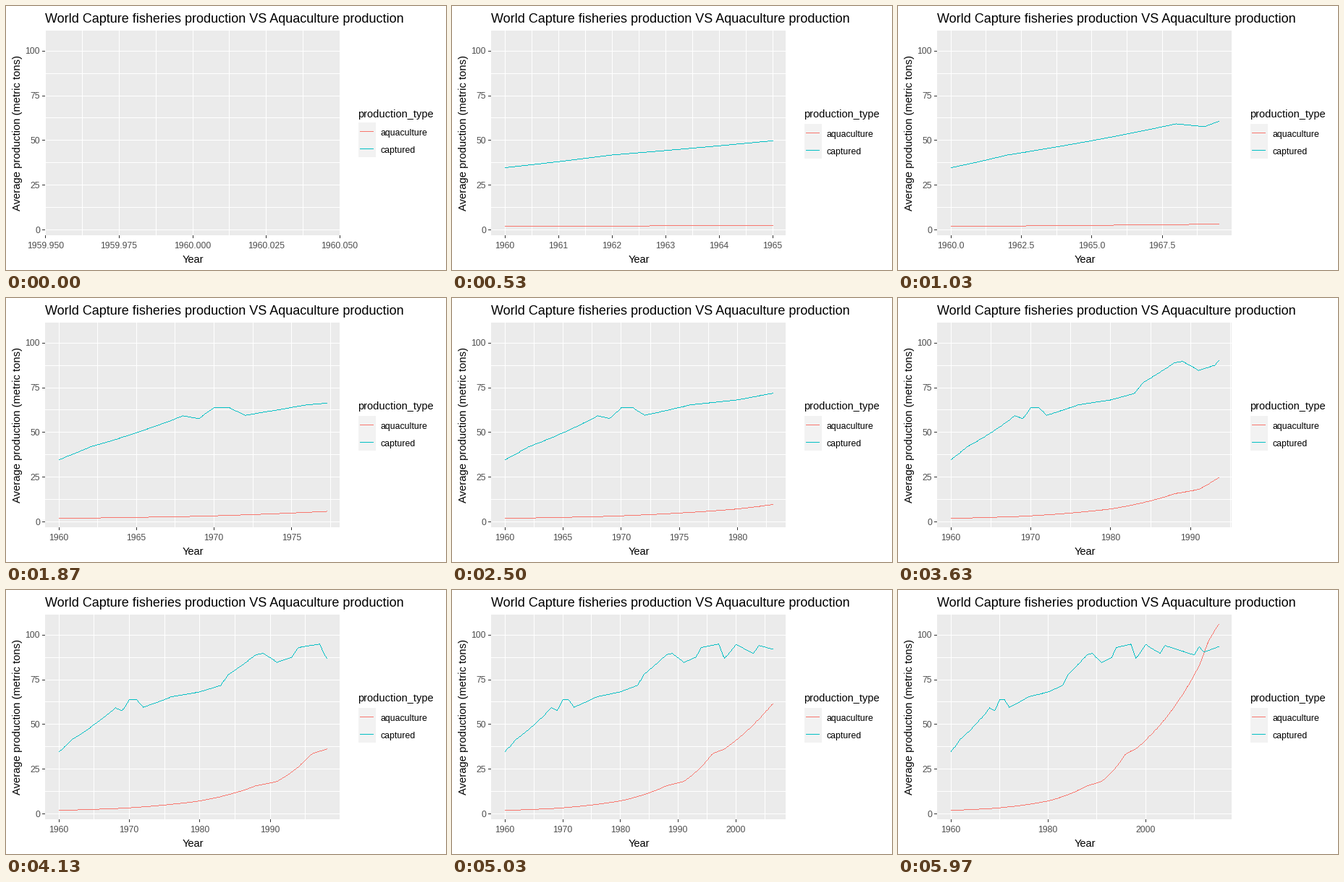
These frames come from a looping animation (608 px wide and 365 px high, 10000 ms). A matplotlib script:

```python
import math

import matplotlib.pyplot as plt
import numpy as np
from matplotlib.animation import FuncAnimation
from matplotlib.collections import LineCollection
from matplotlib.patches import Rectangle

W, H, DPI = 608, 365, 100
PX = 72 / DPI  # one pixel in points
LOOP, INTERVAL = 10000, 20
STEPS, STEP_RATE = 180, 0.03  # reveal steps, steps per ms
LEFT, RIGHT, TOP, BOTTOM = 54, 461, 34, 317
FIRST_YEAR, SPAN = 1960, 55
CORAL, TEAL = "#F8766D", "#00BFC4"

YEARS = np.arange(SPAN + 1)
YEAR_STEPS = np.round(YEARS * (STEPS - 1) / SPAN)


def growth(*turns):
    """Yearly values growing at a steady rate between turning points."""
    years, values = zip(*turns)
    return np.exp(np.interp(YEARS, years, np.log(values)))


AQUACULTURE = growth((0, 2), (9, 3.2), (20, 7.3), (28, 15.8), (31, 18.2),
                     (36, 33.8), (38, 36.3), (51, 82.7), (53, 97.2),
                     (55, 106))
CAPTURED = growth((0, 34.8), (2, 41.9), (8, 59.3), (9, 57.7), (10, 63.8),
                  (11, 63.8), (12, 59.6), (16, 65.5), (20, 68.2),
                  (23, 71.9), (24, 77.7), (28, 89), (29, 89.7), (31, 84.7),
                  (33, 87.5), (34, 93), (37, 94.9), (38, 86.8), (40, 94.7),
                  (43, 89.7), (44, 94.1), (50, 88.8), (51, 93.2),
                  (52, 90.4), (55, 93.5))


def nice_breaks(lo, hi, m=5):
    """Extended Wilkinson tick search for a range that excludes zero."""
    best, found = -2, (lo, hi - lo, 2)
    span = hi - lo
    penalty = 0.5 / (0.1 * span) ** 2
    j = 1
    while True:
        for i, q in enumerate((1, 5, 2, 2.5, 4, 3)):
            simple = 0.25 * (1 - i / 5 - j) + 0.05
            if simple + 0.7 < best:
                return [found[0] + n * found[1] for n in range(found[2])]
            k = 2
            while True:
                dense = 2 - (k - 1) / (m - 1) if k >= m else 1
                if simple + 0.2 + 0.5 * dense < best:
                    break
                z = math.ceil(math.log10(span / (k + 1) / j / q))
                while True:
                    step = j * q * 10.0 ** z
                    over = max(step * (k - 1) - span, 0) / 2
                    cover = 1 - penalty * 2 * over ** 2
                    if simple + 0.2 * cover + 0.5 * dense < best:
                        break
                    start = math.floor(hi / step) * j - (k - 1) * j
                    stop = math.ceil(lo / step) * j
                    for n in range(start, stop + 1):
                        a = n * step / j
                        b = a + step * (k - 1)
                        c = 1 - penalty * ((hi - b) ** 2 + (lo - a) ** 2)
                        ratio = (max(b, hi) - min(a, lo)) / step / (m - 1)
                        d = 2 - max(ratio, 1 / ratio)
                        score = simple + 0.2 * c + 0.5 * d
                        if score > best:
                            best, found = score, (a, step, k)
                    z += 1
                k += 1
        j += 1


def y_pixel(value):
    return 309.2 - 2.4755 * value


def snap(v):
    """Centre of the pixel whose index is nearest to v."""
    return np.floor(v + 0.5) + 0.5


def pixel_run(xs, ys):
    """One-pixel dashes, split by gaps, that rasterise a polyline."""
    px, py = [], []
    for x0, y0, x1, y1 in zip(xs, ys, xs[1:], ys[1:]):
        count = math.ceil(max(abs(x1 - x0), abs(y1 - y0))) + 1
        px.append(np.linspace(x0, x1, count))
        py.append(np.linspace(y0, y1, count))
    px, py = snap(np.concatenate(px)), snap(np.concatenate(py))
    gap = np.full_like(px, np.nan)
    return (np.column_stack([px - 0.5, px + 0.5, gap]).ravel(),
            np.column_stack([py, py, gap]).ravel())


def make_step(step):
    """Elapsed years, x range, visible breaks and minor breaks."""
    now = float(np.interp(step, YEAR_STEPS, YEARS))
    pad = 0.05 * now or 0.05
    lo, hi = FIRST_YEAR - pad, FIRST_YEAR + now + pad
    breaks = nice_breaks(lo, hi)
    gap = breaks[1] - breaks[0]
    minors = [b + gap / 2 for b in [breaks[0] - gap] + breaks]

    def visible(values):
        return [v for v in values if lo - 1e-6 <= v <= hi + 1e-6]

    return now, lo, hi, visible(breaks), visible(minors)


steps = [make_step(s) for s in range(STEPS)]

plt.rcParams["font.family"] = "Liberation Sans"
plt.rcParams["path.simplify"] = False
fig = plt.figure(figsize=(W / 100, H / 100), dpi=DPI, facecolor="white")
ax = fig.add_axes([0, 0, 1, 1])
ax.set(xlim=(0, W), ylim=(H, 0))
ax.axis("off")


def label(x, y, text, size, color="black", **kw):
    return ax.text(x, y, text, fontsize=size * PX, color=color,
                   va="baseline", **kw)


def box(x, y, w, h, color):
    return ax.add_patch(Rectangle((x, y), w, h, fc=color, lw=0,
                                  antialiased=False))


def segments(color, zorder, clip=None):
    lines = LineCollection([], colors=color, linewidths=PX, zorder=zorder)
    lines.set_snap(False)
    ax.add_collection(lines, autolim=False)
    if clip:
        lines.set_clip_path(clip)
    return lines


def stroke(color):
    return ax.plot([], [], color=color, lw=PX, zorder=3, snap=False,
                   solid_capstyle="butt")[0]


panel = box(LEFT, TOP, RIGHT - LEFT, BOTTOM - TOP, "#EBEBEB")
grid = segments("white", 2, panel)
ticks = segments("#333333", 4)
series = [(stroke(CORAL), AQUACULTURE), (stroke(TEAL), CAPTURED)]

label(54, 23, "World Capture fisheries production VS Aquaculture production",
      17.95)
label(258.3, 355, "Year", 14.6, ha="center")
label(20, 175.5, "Average production (metric tons)", 14.75, ha="center",
      rotation=90, rotation_mode="anchor")
for value in range(0, 101, 25):
    label(47, y_pixel(value) + 4.8, str(value), 12.2, "#4D4D4D", ha="right")
year_labels = [label(0, 335, "", 12.2, "#4D4D4D", ha="center")
               for _ in range(12)]

label(486.5, 154, "production_type", 14.6)
legend_box = box(487, 163, 24, 48, "#F2F2F2")
legend = [(12, stroke(CORAL), label(518, 0, "aquaculture", 12.4)),
          (36, stroke(TEAL), label(518, 0, "captured", 12.4))]

rows = [snap(y_pixel(12.5 * n)) for n in range(9)]
row_grid = [[(LEFT, y), (RIGHT, y)] for y in rows]
row_ticks = [[(50, y), (LEFT, y)] for y in rows[::2]]


def place_legend(top):
    legend_box.set_y(top)
    for offset, key, text in legend:
        y = top + offset
        key.set_data([489, 508], [y + 0.5, y + 0.5])
        text.set_y(y + 6)


def draw(frame):
    # Each picture stands for the middle of its interval.
    time = frame * INTERVAL + INTERVAL / 2 + 4
    step = min(int(time * STEP_RATE), STEPS - 1)
    now, lo, hi, breaks, minors = steps[step]

    def x_pixel(year):
        return 54.2 + 406.8 * (year - lo) / (hi - lo)

    def columns(years, top, bottom):
        return [[(x, top), (x, bottom)]
                for x in (snap(x_pixel(year)) for year in years)]

    grid.set_segments(row_grid + columns(breaks + minors, TOP, BOTTOM))
    ticks.set_segments(row_ticks + columns(breaks, BOTTOM, BOTTOM + 4))

    digits = next(d for d in range(5) if d == 4 or
                  all(abs(b - round(b, d)) < 1e-6 for b in breaks))
    for i, text in enumerate(year_labels):
        shown = i < len(breaks)
        text.set_visible(shown)
        if shown:
            text.set_text(f"{breaks[i]:.{digits}f}")
            text.set_x(x_pixel(breaks[i]))

    reached = np.append(YEARS[YEARS < now], now)
    for line, values in series:
        line.set_visible(step > 0)
        if step > 0:
            line.set_data(*pixel_run(
                x_pixel(FIRST_YEAR + reached),
                y_pixel(np.interp(reached, YEARS, values))))
    place_legend(161 if step == 0 else 163)


animation = FuncAnimation(fig, draw, frames=LOOP // INTERVAL,
                          interval=INTERVAL, init_func=lambda: draw(0),
                          repeat=True, repeat_delay=0,
                          cache_frame_data=False)
plt.show()
```
